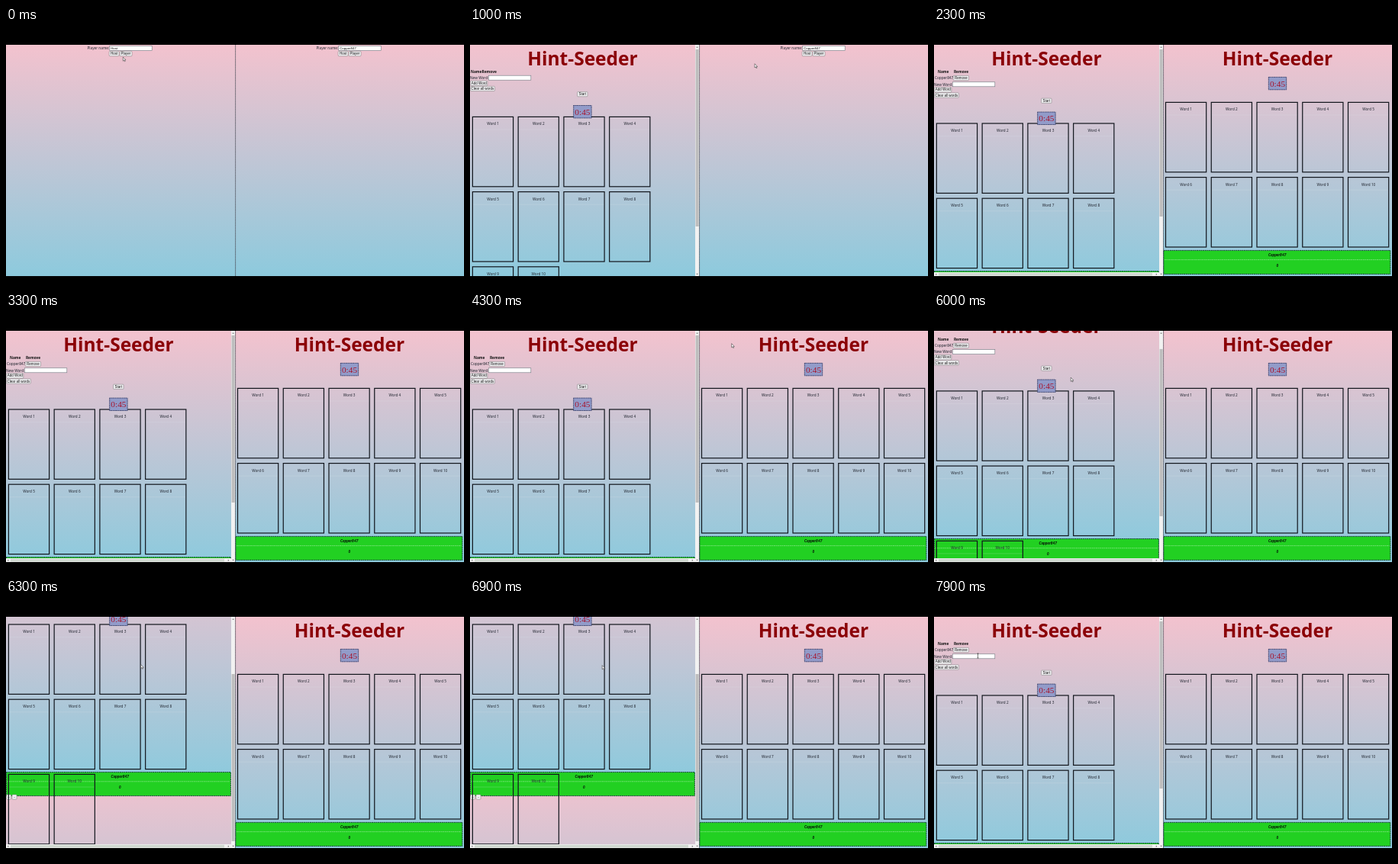
An HTML page for the animation above (8000 ms loop, 600 px wide and 338 px high).

```html
<!DOCTYPE html>
<html lang="en">
<head>
<meta charset="utf-8">
<title>Word game lobby</title>
<style>
  html, body { margin: 0; width: 100%; height: 100%; overflow: hidden; background: #000; }
  svg { display: block; width: 100vw; height: 100vh; }
  text { font-family: "Noto Sans", sans-serif; fill: #222630; }
  .b { font-weight: 700; fill: #111; }
  .ui { font-family: "Liberation Sans", sans-serif; fill: #111; }
  .title { font-weight: 700; fill: #8b0006; }
  .clock { font-family: "Liberation Serif", serif; fill: #a8142c; }
  .tag { font-family: Lato, sans-serif; font-weight: 900; font-style: italic; fill: #08210a; }
</style>
</head>
<body>
<svg id="stage" viewBox="0 0 600 338"></svg>
<script>
const LOOP = 8000, STEP = 100, HOST_AT = 500, JOIN_AT = 1600;
const TOP = 22, VIEW = 303, ROW = 8.6;
const TITLE = 'Hint-Seeder', PLAYER = 'Copper847';

// time, x, y of the pointer tip
const POINTER = [
  [0, 153.3, 38], [100, 153, 37], [300, 142, 34], [500, 142, 34],
  [1000, 373, 46.8], [1300, 455, 34], [1900, 456, 34],
  [4000, 400, 58], [4300, 342.7, 38.7], [4900, 270, 62],
  [5600, 183.3, 81], [6300, 176.6, 84.5], [7200, 172, 86],
  [7700, 57.5, 73], [8000, 57.5, 73]
];
const SCROLL = [[0, 0], [5900, 0], [6200, 93], [6900, 93], [7300, 0], [8000, 0]];

const rect = (x, y, w, h, fill, extra = '') =>
  `<rect x="${x}" y="${y}" width="${w}" height="${h}" fill="${fill}" ${extra}/>`;
const line = (x1, y, x2, stroke, extra = '') =>
  `<path d="M${x1} ${y}H${x2}" stroke="${stroke}" stroke-width=".5" ${extra}/>`;
const text = (x, y, s, size, cls = '', anchor = 'start') =>
  `<text x="${x}" y="${y}" font-size="${size}" class="${cls}" text-anchor="${anchor}">${s}</text>`;
const group = (id, body, extra = '') => `<g id="${id}" ${extra}>${body}</g>`;

const button = (x, y, w, label) =>
  rect(x, y, w, 6.2, '#f2f2f4', 'rx=".8" stroke="#777" stroke-width=".5"') +
  text(x + w / 2, y + 4.7, label, 4.5, 'ui', 'middle');
const field = (x, y, value = '') =>
  rect(x, y, 55.5, 6, '#fff', 'stroke="#707880" stroke-width=".6"') +
  text(x + 1.5, y + 4.6, value, 4.4, 'ui');
const title = cx => text(cx, 48.7, TITLE, 24.5, 'title', 'middle');
const clock = (x, y) =>
  rect(x, y, 23.4, 16.4, '#929bc9', 'stroke="#29335f" stroke-width=".9" stroke-dasharray="1.6 .7"') +
  text(x + 11.7, y + 12.2, '0:45', 11.3, 'clock', 'middle');

function card(x, y, n) {
  return rect(x, y, 53.2, 91.4, 'none', 'stroke="#11151c" stroke-width="1.2"') +
    text(x + 26.6, y + 10.9, 'Word ' + n, 4.7, '', 'middle') +
    line(x + 1, y + 16.6, x + 52.4, '#dfe2e8', 'opacity=".4"');
}
const cards = (x, y, columns) => Array.from({ length: 10 }, (_, i) =>
  card(x + i % columns * 59.75, y + Math.floor(i / columns) * 98.2, i + 1)).join('');

const scorePanel = (x, y, w) =>
  rect(x, y, w, 31, '#22d022', 'stroke="#123a35" stroke-width=".9" stroke-dasharray="2 .7"') +
  text(x + 149, y + 7.7, PLAYER, 4.9, 'tag', 'middle') +
  line(x + 1, y + 12.2, x + w - 1, '#b9f0b9', 'stroke-dasharray="2 .6"') +
  text(x + 149, y + 21.4, '0', 4.6, 'tag', 'middle');

const login = (x, name) =>
  text(x + 135.2, 28.3, 'Player name:', 4.7, '', 'end') + field(x + 135.7, 23.5, name) +
  button(x + 135.2, 30.6, 12.8, 'Host') + button(x + 149, 30.6, 16, 'Player');

const sky = (x, y, w) => rect(x, y, w, VIEW, 'url(#sky)');

const hostTools =
  text(0, 67, 'New Word:', 4.75) + field(24.3, 62.2) +
  button(.6, 69.2, 22.2, 'Add Word') + button(.6, 76.4, 31.8, 'Clear all words') +
  button(140.6, 83.6, 13.4, 'Start');
const host = sky(0, TOP, 300) + sky(0, TOP + VIEW, 300) + title(147.5) +
  group('solo', text(1, 59, 'Name', 4.8, 'b') + text(15.6, 59, 'Remove', 4.8, 'b')) +
  group('joined',
    text(12.2, 59, 'Name', 4.8, 'b', 'middle') + text(35.5, 59, 'Remove', 4.8, 'b', 'middle') +
    text(1, 67.3, PLAYER, 4.7) + button(25.3, 62.4, 20.2, 'Remove') +
    scorePanel(.4, 318.6, 294) + button(.6, 348, 6, '+') + button(8, 348, 6, '-')) +
  group('below', hostTools + cards(3.4, 116.4, 4) + clock(135.7, 101.5));

const arrow = (x, y, d) => `<path transform="translate(${x} ${y})" d="${d}" fill="#666"/>`;
const bars =
  rect(295, TOP, 5.3, VIEW, '#f1f1f1') + rect(295.6, 28, 4, 232, '#bdbdbd', 'id="thumb"') +
  arrow(297.6, 25, 'M-1.2 .7L0-.7 1.2 .7z') + arrow(297.6, 322.5, 'M-1.2-.7L0 .7 1.2-.7z') +
  group('hbar', rect(0, 320, 295, 5.3, '#f1f1f1') + rect(6, 320.7, 280, 3.8, '#d0d8d0') +
    arrow(2.6, 322.7, 'M.7-1.2L-.7 0 .7 1.2z') + arrow(291.5, 322.7, 'M-.7-1.2L.7 0-.7 1.2z'));

const game = title(450) + clock(438.3, 64.4) + cards(303.5, 97.4, 5) + scorePanel(300.8, 291.4, 297);

document.getElementById('stage').innerHTML = `
  <defs>
    <linearGradient id="sky" x2="0" y2="1">
      <stop stop-color="#f3c2ce"/><stop offset="1" stop-color="#8dcadd"/>
    </linearGradient>
    <clipPath id="left">${rect(0, TOP, 300, VIEW, '#000')}</clipPath>
  </defs>
  ${rect(0, 0, 600, 338, '#000')}
  ${sky(0, TOP, 600)}
  ${group('loginLeft', login(0, 'Host'))}
  ${group('hostView', `${group('page', host)}${bars}`, 'clip-path="url(#left)"')}
  ${group('loginRight', login(300, PLAYER))}
  ${group('gameView', game)}
  <path d="M300.6 ${TOP}V325" stroke="#4c4f58" stroke-width=".9" stroke-dasharray="1.4 .5"/>
  ${group('hand', '<path d="M0 0V5.2L1.3 4.1 2.1 5.9 2.9 5.5 2.1 3.8H3.6z" fill="#fff" stroke="#222" stroke-width=".5"/>')}
  ${group('beam', '<path d="M-1-3H1M0-3V3M-1 3H1" stroke="#222" stroke-width=".6"/>')}`;

const el = id => document.getElementById(id);
const show = (id, on) => el(id).style.display = on ? '' : 'none';
const move = (id, x, y) => el(id).setAttribute('transform', `translate(${x} ${y})`);

function sample(track, t) {
  const i = Math.max(1, track.findIndex(k => k[0] > t));
  const a = track[i - 1], b = track[i];
  const p = (t - a[0]) / (b[0] - a[0]), e = p * p * (3 - 2 * p);
  return a.slice(1).map((v, k) => v + (b[k + 1] - v) * e);
}

function draw(t) {
  const hosting = t >= HOST_AT, joined = t >= JOIN_AT;
  show('loginLeft', !hosting);
  show('hostView', hosting);
  show('loginRight', !joined);
  show('gameView', joined);
  show('solo', !joined);
  show('joined', joined);
  show('hbar', joined);
  move('below', 0, joined ? ROW : 0);

  const [scroll] = sample(SCROLL, t);
  move('page', 0, -scroll);
  el('thumb').setAttribute('height', joined ? 219 : 232);
  move('thumb', 0, scroll * 69 / 93);

  const [x, y] = sample(POINTER, t);
  move('hand', x, y);
  move('beam', x, y);
  show('hand', t < 1900 || (t >= 4000 && t < 7700));
  show('beam', t >= 7700);
}

const start = performance.now();
function tick() {
  const t = (performance.now() - start) % LOOP;
  draw(Math.floor(t / STEP) * STEP);
  requestAnimationFrame(tick);
}
tick();
</script>
</body>
</html>
```
